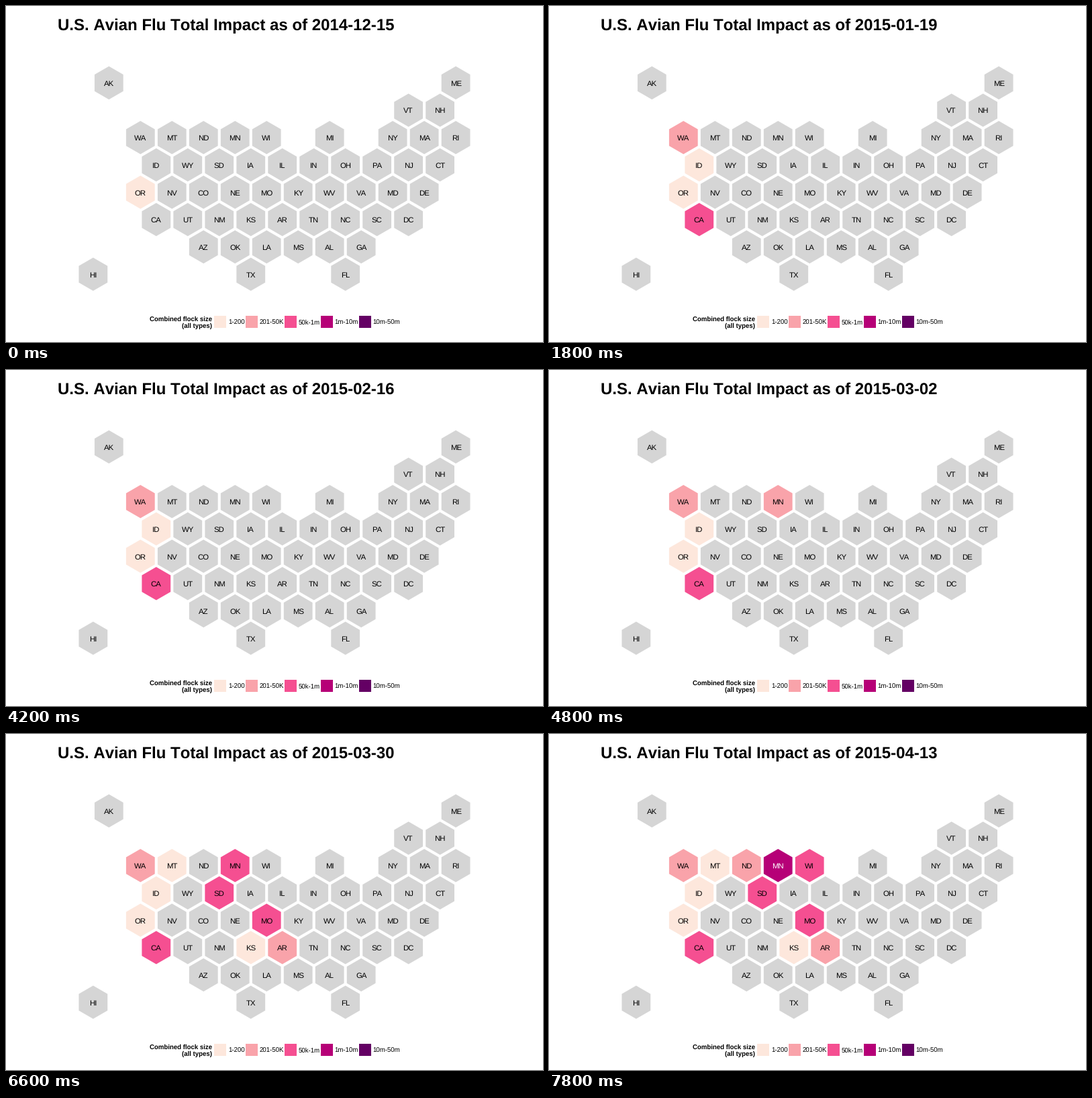
A matplotlib script that plays this animation: 800 by 500 pixels, repeating every 8 s.

```python
import matplotlib.pyplot as plt
from matplotlib.animation import FuncAnimation
from matplotlib.patches import Rectangle, RegularPolygon

plt.rcParams.update({
    "font.family": "Liberation Sans",
    "text.hinting": "no_hinting",
    "text.kerning_factor": 16,  # large factor switches kerning off
})

W, H, DPI = 800, 500, 100
TICK, STEP, LOOP = 200, 600, 8000  # ms

GREY = "#d5d5d5"
LEVELS = [
    ("1-200", "#fde7dc", 310.4),
    ("201-50K", "#f9a3aa", 357.3),
    ("50k-1m", "#f54f91", 415.2),
    ("1m-10m", "#b60077", 468.7),
    ("10m-50m", "#640064", 525.7),
]

# (row, first half-column, states two half-columns apart)
RUNS = [
    (0, -2, "AK"), (0, 20, "ME"),
    (1, 17, "VT NH"),
    (2, 0, "WA MT ND MN WI"), (2, 12, "MI"), (2, 16, "NY MA RI"),
    (3, 1, "ID WY SD IA IL IN OH PA NJ CT"),
    (4, 0, "OR NV CO NE MO KY WV VA MD DE"),
    (5, 1, "CA UT NM KS AR TN NC SC DC"),
    (6, 4, "AZ OK LA MS AL GA"),
    (7, -3, "HI"), (7, 7, "TX"), (7, 13, "FL"),
]

# Each week: date and the states whose level changes
WEEKS = [
    ("2014-12-15", {"OR": 1}),
    ("2015-01-05", {"WA": 1}),
    ("2015-01-12", {"WA": 2, "ID": 1}),
    ("2015-01-19", {"CA": 3}),
    ("2015-01-26", {}),
    ("2015-02-02", {}),
    ("2015-02-09", {}),
    ("2015-02-16", {}),
    ("2015-03-02", {"MN": 2}),
    ("2015-03-09", {"MO": 3, "AR": 2, "KS": 1}),
    ("2015-03-23", {"MN": 3}),
    ("2015-03-30", {"MT": 1, "SD": 3}),
    ("2015-04-06", {"ND": 2}),
    ("2015-04-13", {"MN": 4, "WI": 3}),
]

fig = plt.figure(figsize=(W / DPI, H / DPI), dpi=DPI, facecolor="white")
ax = fig.add_axes([0, 0, 1, 1])
ax.set_xlim(0, W)
ax.set_ylim(H, 0)
ax.axis("off")


def label(x, y, text, px, **style):
    return ax.text(x, y, text, fontsize=px * 72 / DPI, va="baseline", **style)


title = label(76.8, 36, "", 24, weight="bold")

hexes, names = {}, {}
for row, col, states in RUNS:
    y = 114.4 + 40.68 * row
    for i, state in enumerate(states.split()):
        x = 200.3 + 23.49 * (col + 2 * i)
        hexes[state] = ax.add_patch(
            RegularPolygon((x, y), 6, radius=24.7, lw=0, fc=GREY))
        names[state] = label(x, round(y + 4.4), state, 11.4, ha="center")

label(307, 469, "Combined flock size", 9.6, weight="bold", ha="right")
label(307, 479, "(all types)", 9.6, weight="bold", ha="right")
for text, color, x in LEVELS:
    ax.add_patch(Rectangle((x, 461), 18, 18, lw=0, fc=color))
    label(x + 20.4, 474, text, 9.6)


def draw(tick):
    week = tick * TICK // STEP
    levels = {}
    for _, changes in WEEKS[:week + 1]:
        levels.update(changes)
    title.set_text(f"U.S. Avian Flu Total Impact as of {WEEKS[week][0]}")
    for state, cell in hexes.items():
        level = levels.get(state, 0)
        cell.set_facecolor(LEVELS[level - 1][1] if level else GREY)
        names[state].set_color("white" if level >= 4 else "black")
    return [title, *hexes.values(), *names.values()]


anim = FuncAnimation(fig, draw, frames=LOOP // TICK, interval=TICK,
                     repeat=True, repeat_delay=0)
plt.show()
```
